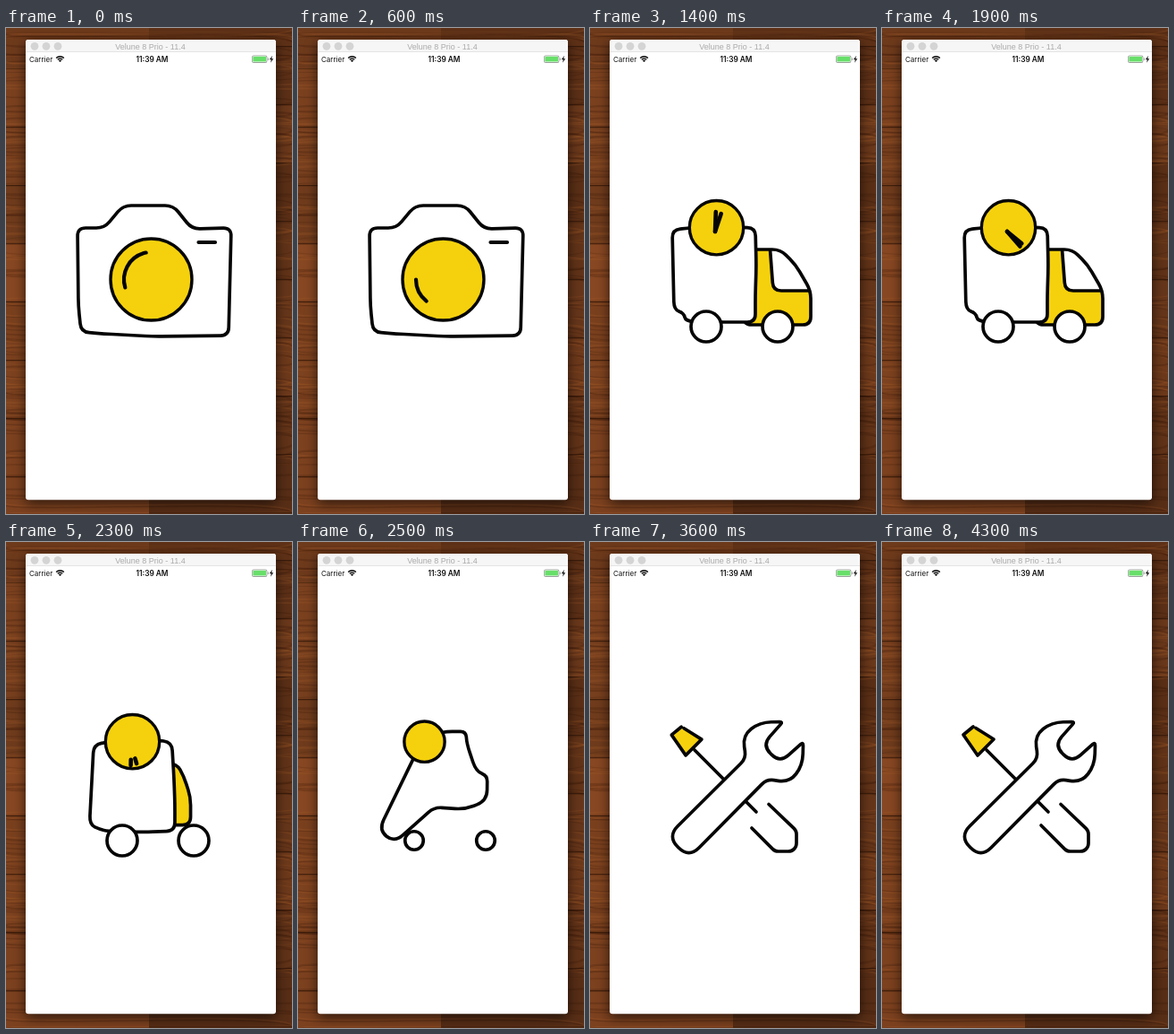
Animation of 320 by 542 pixels, one loop 4.4 s. Source, as an HTML page with a canvas:

```html
<!DOCTYPE html>
<html>
<head>
<meta charset="utf-8">
<style>
html, body { margin: 0; width: 100%; height: 100%; overflow: hidden; background: #6b3c1c; }
canvas { display: block; width: 320px; height: 542px; }
</style>
</head>
<body>
<canvas id="stage"></canvas>
<script>
const W = 320, H = 542, LOOP = 4400, STEP = 100;
const YELLOW = '#f5d10d', INK = '#050505', DEG = Math.PI / 180;
const dpr = window.devicePixelRatio || 1;
const canvas = document.getElementById('stage');
canvas.width = W * dpr;
canvas.height = H * dpr;
const ctx = canvas.getContext('2d');
ctx.scale(dpr, dpr);

const clamp = v => Math.max(0, Math.min(1, v));
const mix = (a, b, p) => a + (b - a) * p;
const linear = p => p;
const easeIn = p => p * p;
const easeOut = p => 1 - (1 - p) ** 3;
const smooth = p => p * p * (3 - 2 * p);
const span = (t, a, b, ease = smooth) => ease(clamp((t - a) / (b - a)));
const morph = (a, b, p) => a.map((q, i) => q.map((v, k) => mix(v, b[i][k], p)));
const soft = pts => pts.map(([x, y]) => [x, y, 9]);

// Corners run clockwise; equal indices turn into each other
const CAMERA = soft([[80, 223], [110, 223], [131, 198], [160, 198], [187, 198], [208, 224],
  [252, 223], [249, 343], [165, 344], [110, 341], [84, 339], [81, 310]]);
const BOX = soft([[92, 225], [112, 223], [131, 222], [160, 222], [185, 223], [186, 265],
  [185, 298], [185, 328], [150, 328], [107, 327], [105, 318], [94, 314]]);
const CAB = soft([[172, 247], [213, 247], [230, 264], [247, 293], [247, 331], [172, 331]]);

// Half a wrench along its axis: distance, offset, softness; mirrored and turned 45 degrees
function makeWrench() {
  const half = [[-171, 17, 16.5], [-47, 16.5, 8], [-32, 37, 13], [-8, 34, 15], [11, 16, 4], [-24, 14, 13]];
  const place = side => ([u, v, r]) =>
    [219.5 + (u + v * side) * Math.SQRT1_2, 219.5 + (v * side - u) * Math.SQRT1_2, r];
  const ring = [...half.map(place(-1)), ...half.map(place(1)).reverse()];
  return [...ring.slice(1), ring[0]];
}
const WRENCH = makeWrench();

function softPath(pts) {
  const n = pts.length;
  const toward = (a, b, d) => {
    const k = Math.min(d / (Math.hypot(b[0] - a[0], b[1] - a[1]) || 1), 0.5);
    return [mix(a[0], b[0], k), mix(a[1], b[1], k)];
  };
  ctx.beginPath();
  pts.forEach((p, i) => {
    ctx.lineTo(...toward(p, pts[(i + n - 1) % n], p[2]));
    ctx.quadraticCurveTo(p[0], p[1], ...toward(p, pts[(i + 1) % n], p[2]));
  });
  ctx.closePath();
}

function paint(fill, width = 3.7) {
  if (fill) { ctx.fillStyle = fill; ctx.fill(); }
  ctx.strokeStyle = INK;
  ctx.lineWidth = width;
  ctx.stroke();
}

function disc(x, y, r, fill, width) {
  if (r < 0.5) return;
  ctx.beginPath();
  ctx.arc(x, y, r, 0, 7);
  paint(fill, Math.min(width, r));
}

function line(x1, y1, x2, y2, width) {
  ctx.beginPath();
  ctx.moveTo(x1, y1);
  ctx.lineTo(x2, y2);
  paint(null, width);
}

function drawBody(t) {
  softPath(t < 2000
    ? morph(CAMERA, BOX, span(t, 700, 1400, easeOut))
    : morph(BOX, WRENCH, span(t, 2200, 2800)));
  paint('#fff');
}

function drawCab(t) {
  const k = span(t, 1000, 1350) - span(t, 2100, 2480);
  if (k <= 0) return;
  const tall = mix(0.66, 1, k);
  const cab = CAB.map(([x, y, r]) => [172 + (x - 172) * k, 247 + (y - 247) * tall, r]);
  softPath(cab);
  ctx.fillStyle = YELLOW;
  ctx.fill();
  ctx.save();
  ctx.clip();
  ctx.translate((1 - k) * 100, 0);
  softPath([[201, 240, 2], [260, 240, 2], [260, 293, 2], [205, 293, 9]]);
  paint('#fff');
  ctx.restore();
  softPath(cab);
  paint();
}

function drawHand(degrees, len, from) {
  if (from > 0.98) return;
  const x = Math.sin(degrees * DEG) * len, y = -Math.cos(degrees * DEG) * len;
  line(140 + x * from, 227 + y * from, 140 + x, 227 + y, 4.6);
}

function drawDial(t) {
  const move = span(t, 650, 950);
  const x = mix(162.5, 141.5, move), y = mix(280.5, 222.7, move);
  disc(x, y, mix(45.5, 30.2, move) * (1 - span(t, 2350, 2650, easeIn)), YELLOW, 3.4);

  const p = span(t, 0, 600, linear);
  const start = mix(163, 128, p);
  const end = mix(mix(259, 180, p), start, span(t, 600, 750));
  if (end - start > 1) {
    ctx.beginPath();
    ctx.arc(x, y, 30.5, start * DEG, end * DEG);
    paint(null, 4.2);
  }

  const spin = span(t, 1350, 2150), out = span(t, 2100, 2380, linear);
  drawHand(mix(0, 181, spin), 22, Math.max(1 - span(t, 900, 1300), out));
  drawHand(mix(17, 163, spin), 21, Math.max(1 - span(t, 1050, 1380), out));
}

// Open stroke with rounded corners that grows from the middle of its path
function grow(pts, p, radius = 0) {
  let total = 0;
  ctx.beginPath();
  pts.forEach(([x, y], i) => {
    const next = pts[i + 1];
    if (i) total += Math.hypot(x - pts[i - 1][0], y - pts[i - 1][1]);
    if (i && next) ctx.arcTo(x, y, ...next, radius);
    else ctx.lineTo(x, y);
  });
  const len = total * p;
  if (len < 0.5) return;
  ctx.setLineDash([len, total * 2]);
  ctx.lineDashOffset = (len - total) / 2;
  paint();
  ctx.setLineDash([]);
}

function drawDriver(t) {
  const tip = span(t, 3250, 3700, easeOut);
  grow([[117, 232], [186, 301]], span(t, 3000, 3500, easeOut));
  grow([[178, 316], [207, 345], [231, 345], [231, 322], [200, 292.5]], span(t, 3150, 3900, easeOut), 9);
  if (!tip) return;
  ctx.beginPath();
  for (const [x, y] of [[102, 206], [91, 215], [107, 238], [125, 220], [105, 207.5]])
    ctx.lineTo(mix(115, x, tip), mix(230, y, tip));
  paint(YELLOW, 3.7 * tip);
}

function drawIcon(t) {
  ctx.lineCap = ctx.lineJoin = 'round';
  drawCab(t);
  drawDriver(t);
  drawBody(t);
  const flash = 1 - span(t, 650, 850);
  if (flash > 0.02) line(215.5, 239, 215.5 + 18.5 * flash, 239, 4.2);
  const wheel = 17 * span(t, 1050, 1350, easeOut) * (1 - span(t, 2330, 2600, easeIn));
  for (const x of [130, 210]) disc(x, 333, wheel, '#fff', 3.7);
  drawDial(t);
}

function drawWood() {
  let seed = 11;
  const rnd = () => (seed = seed * 16807 % 2147483647) / 2147483647;
  for (const side of [0, 1]) {
    const x = side * W / 2;
    for (let y = -20 - side * 25; y < H; y += 65) {
      ctx.fillStyle = `hsl(22, 60%, ${(side ? 21 : 27) + rnd() * 7}%)`;
      ctx.fillRect(x, y, W / 2, 66);
      ctx.fillStyle = 'rgba(35,14,3,.6)';
      ctx.fillRect(x, y, W / 2, 1.3);
    }
  }
  for (let i = 0; i < 150; i++) {
    const y = rnd() * H, bend = rnd() * 16 - 8;
    ctx.strokeStyle = rnd() < 0.6 ? 'rgba(45,18,4,.2)' : 'rgba(190,108,50,.15)';
    ctx.lineWidth = 0.6 + rnd() * 2;
    ctx.beginPath();
    ctx.moveTo(0, y);
    ctx.bezierCurveTo(20, y + bend, 300, y - bend, W, y + bend);
    ctx.stroke();
  }
}

function text(s, x, y, font, color, align) {
  ctx.font = font;
  ctx.fillStyle = color;
  ctx.textAlign = align;
  ctx.fillText(s, x, y);
}

function panel(x, y, w, h, r, fill) {
  ctx.fillStyle = fill;
  ctx.beginPath();
  ctx.roundRect(x, y, w, h, r);
  ctx.fill();
}

function drawWindow() {
  ctx.save();
  ctx.shadowColor = 'rgba(0,0,0,.65)';
  ctx.shadowBlur = 14 * dpr;
  ctx.shadowOffsetY = 4 * dpr;
  panel(22, 13, 280, 513.3, 3, '#fff');
  ctx.restore();
  panel(22, 13, 280, 14, [3, 3, 0, 0], '#f6f6f6');
  panel(22, 26.3, 280, 0.7, 0, '#dedede');
  for (const x of [32, 45, 58]) panel(x - 4.4, 15.9, 8.8, 8.8, 4.4, '#d4d4d4');
  text('Velune 8 Prio - 11.4', 161.5, 23.6, '9px "Liberation Sans", Arial, sans-serif', '#aaa', 'center');
}

function drawStatus() {
  text('Carrier', 26, 38, '8px Inter, sans-serif', '#111', 'left');
  text('11:39 AM', 163.5, 38, '600 8.3px Inter, sans-serif', '#111', 'center');
  ctx.lineCap = 'butt';
  for (const r of [1.2, 3.8, 6.2]) {
    ctx.beginPath();
    ctx.arc(60.5, 38, r, -135 * DEG, -45 * DEG);
    paint(null, r < 2 ? 2.4 : 1.4);
  }
  panel(275, 30.5, 17.4, 8.4, 2.2, '#9a9f9a');
  panel(275.8, 31.3, 15.8, 6.8, 1.6, '#fff');
  panel(276.3, 31.8, 14.8, 5.8, 1.2, '#68df6a');
  panel(292.8, 33.4, 1, 2.6, 0, '#9a9f9a');
  ctx.fillStyle = '#111';
  ctx.beginPath();
  for (const s of [1, -1])
    for (const [x, y] of [[1, -4], [-2.2, 0.5], [-0.2, 0.5]]) ctx.lineTo(297 + x * s, 34.8 + y * s);
  ctx.fill();
}

function render(now) {
  const t = Math.floor(now % LOOP / STEP) * STEP;
  drawWood();
  drawWindow();
  drawStatus();
  drawIcon(t);
}

const begin = performance.now();
function tick() {
  render(performance.now() - begin);
  requestAnimationFrame(tick);
}
tick();
</script>
</body>
</html>
```
